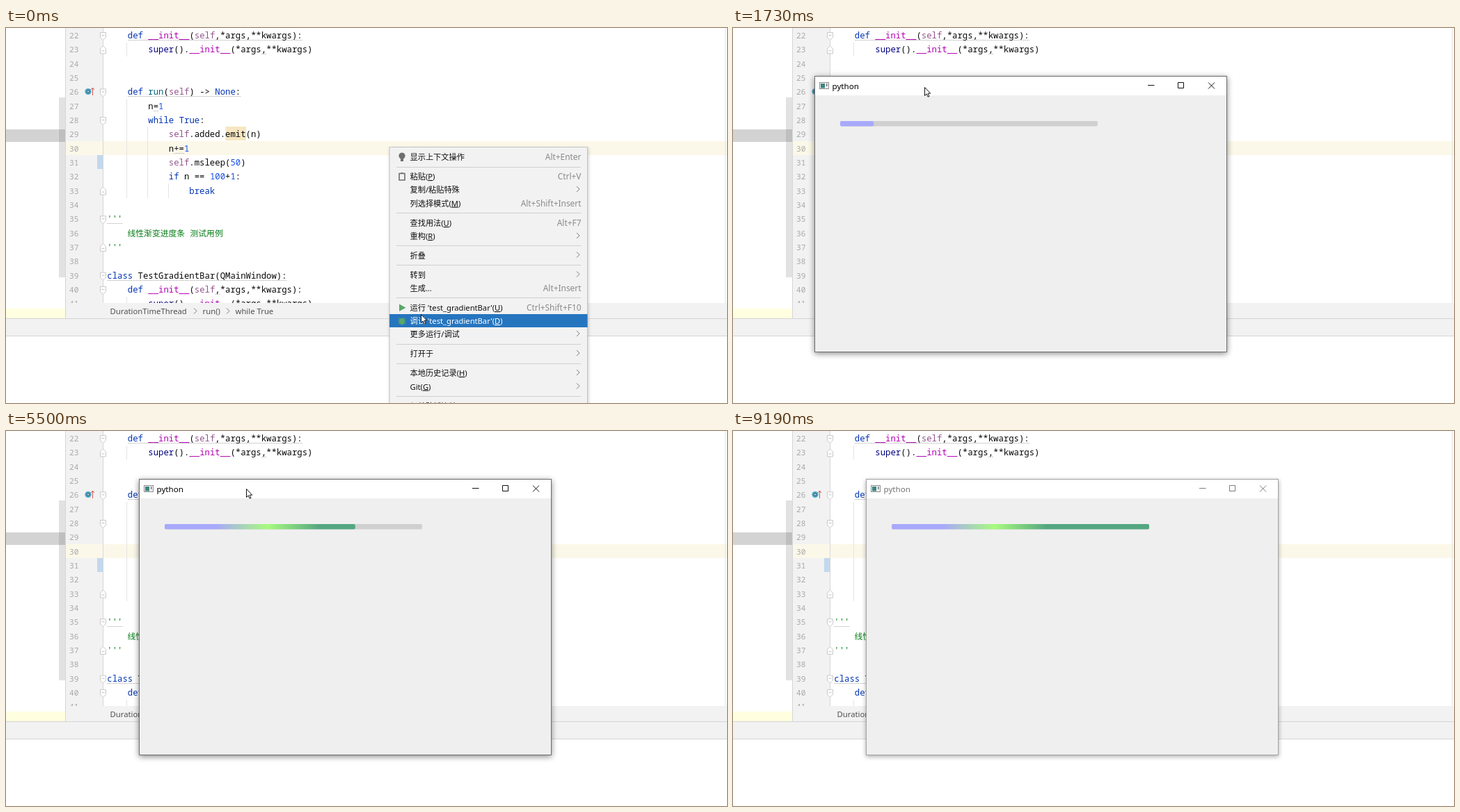
Animation, 1036 px wide and 540 px high, one loop 9230 ms. Source, as an HTML page:

```html
<!DOCTYPE html>
<html lang="zh">
<head>
<meta charset="utf-8">
<style>
  html, body { margin: 0; width: 100%; height: 100%; overflow: hidden; background: #fff; }
  svg { display: block; width: 1036px; height: 540px; }
  text { white-space: pre; font: 11.3px "Noto Sans", "Noto Sans CJK SC", sans-serif; }
  .code { font: 12.31px "Noto Sans Mono", "DejaVu Sans Mono", monospace; fill: #080808; }
  .num { font-size: 11.2px; fill: #a9a9a9; }
  .kw { fill: #0033b3; }
  .magic { fill: #b200b2; }
  .self { fill: #94558d; }
  .lit { fill: #1750eb; }
  .fn { fill: #00627a; }
  .builtin { fill: #000080; }
  .doc { fill: #067d17; }
  .note { font-size: 11.8px; }
  .crumb { fill: #505050; }
  .item { font-size: 11.2px; fill: #111; }
  .key { font-size: 11.9px; fill: #8a8a8a; text-anchor: end; }
  .picked text { fill: #fff; }
  .u { text-decoration: underline; }
  .title { font-size: 11.6px; }
</style>
</head>
<body>
<svg id="stage" viewBox="0 0 1036 540"></svg>
<script>
const LOOP = 9230, CHAR = 7.386, LEFT = 145.3;
const rowY = n => 11 + (n - 22) * 20.33;
const colX = c => LEFT + c * CHAR;
const rect = (x, y, w, h, fill, more = '') =>
  `<rect x="${x}" y="${y}" width="${w}" height="${h}" fill="${fill}" ${more}/>`;
const path = (d, stroke, fill = 'none', more = '') =>
  `<path d="${d}" stroke="${stroke}" fill="${fill}" ${more}/>`;
const text = (x, y, cls, s) => `<text x="${x}" y="${y}" class="${cls}">${s}</text>`;
const chevron = (x, y) => path(`M${x - 2} ${y - 4}l4 4l-4 4`, '#7a7a7a');

// ---- editor ----
const code = {
  22: '    def __init__(self,*args,**kwargs):',
  23: '        super().__init__(*args,**kwargs)',
  26: '    def run(self) -> None:',
  27: '        n=1',
  28: '        while True:',
  29: '            self.added.emit(n)',
  30: '            n+=1',
  31: '            self.msleep(50)',
  32: '            if n == 100+1:',
  33: '                break',
  35: "'''",
  37: "'''",
  39: 'class TestGradientBar(QMainWindow):',
  40: '    def __init__(self,*args,**kwargs):',
  41: '        super().__init__(*args,**kwargs)'
};
const kinds = [
  [/^(def|class|while|if|break|True|None)$/, 'kw'], [/^__/, 'magic'], [/^self$/, 'self'],
  [/^\d/, 'lit'], [/^run$/, 'fn'], [/^super$/, 'builtin'], [/^'/, 'doc']
];
const paint = s => s.replace(/\w+|'+/g, word => {
  const kind = kinds.find(([re]) => re.test(word));
  return kind ? `<tspan class="${kind[1]}">${word}</tspan>` : word;
}).replace('-> ', '-&gt; ');

function fold(n, up) {
  const y = rowY(n) + 0.5, s = up ? -1 : 1;
  return path(`M135.5 ${y - 5 * s}h8v${7 * s}l-4 ${4 * s}l-4 ${-4 * s}z`, '#c9c9c9', '#fff')
    + path(`M137.5 ${y - s}h4`, '#c0c0c0');
}

function editor() {
  let s = rect(86, 0, 53, 396, '#f2f2f2') + rect(86, 163, 950, 20, '#fcf8e9')
    + rect(0, 146, 85, 18, '#d3d3d3') + rect(76, 100, 9, 259, '#e2e2e2') + rect(76, 146, 9, 18, '#bfbfbf')
    + rect(0, 404, 85, 14, '#ffffe0') + rect(131, 183, 8, 20, '#c2d8ee') + rect(315.5, 142, 29.5, 20, '#f6e6c2')
    + path('M85.5 0V418M139.5 0V396', '#d6d6d6') + path('M1033.5 0V396', '#e2e2e2')
    + path('M173.5 21V41M173.5 102V245M203.5 142V245M233.5 224V245M173.5 387V396', '#e4e4e4');
  const marks = [[22, 4, 38], [23, 30, 31], [26, 4, 26], [27, 9, 10], [30, 13, 15], [35, 0, 3], [39, 0, 35], [40, 21, 22]];
  for (const [n, a, b] of marks)
    s += path(`M${colX(a)} ${Math.round(rowY(n) + 6) + 0.5}H${colX(b)}`, '#c4c4c4', 'none', 'stroke-dasharray="2 .6"');
  for (let n = 22; n <= 41; n++) {
    s += text(91, rowY(n) + 4, 'code num', n);
    if (code[n]) s += text(LEFT, rowY(n) + 4, 'code', paint(code[n]));
  }
  s += text(174.5, 299.5, 'doc note', '线性渐变进度条') + text(264.5, 299.5, 'doc note', '测试用例');
  for (const n of [22, 26, 28, 35, 39, 40]) s += fold(n, false);
  for (const n of [23, 33, 37]) s += fold(n, true);
  s += '<circle cx="118" cy="91.5" r="4.6" fill="#4ba6c9"/><circle cx="118" cy="91.5" r="1.8" fill="#bfe3f0" stroke="#27495a"/>'
    + path('M124.5 97V86.5M122 89l2.5 -3l2.5 3', '#d0574f');
  s += rect(86, 396, 950, 22, '#f2f2f2') + rect(0, 418, 1036, 26, '#f2f2f2')
    + path('M0 418.5H1036M0 443.5H1036', '#d4d4d4')
    + text(149.5, 411.5, 'crumb', 'DurationTimeThread') + chevron(272, 407.5)
    + text(282.5, 411.5, 'crumb', 'run()') + chevron(319, 407.5) + text(329.5, 411.5, 'crumb', 'while True');
  return s;
}

// ---- context menu: centre y, label, shortcut ('>' opens a submenu) ----
const items = [
  [186, '显示上下文操作', 'Alt+Enter'], [214, '粘贴(_P)', 'Ctrl+V'], [233, '复制/粘贴特殊', '>'],
  [252.5, '列选择模式(_M)', 'Alt+Shift+Insert'], [281, '查找用法(_U)', 'Alt+F7'], [300, '重构(_R)', '>'],
  [327.5, '折叠', '>'], [355.5, '转到', '>'], [375, '生成...', 'Alt+Insert'],
  [403, "运行 'test_gradientBar'(_U)", 'Ctrl+Shift+F10'], [422, "调试 'test_gradientBar'(_D)", ''],
  [441, '更多运行/调试', '>'], [469, '打开于', '>'], [497, '本地历史记录(_H)', '>'], [516.5, 'Git(_G)', '>'],
  [545, '与剪贴板比较(_B)', '']
];
function menu() {
  let s = rect(551, 171.5, 284.5, 400, '#f2f2f2', 'stroke="#c2c2c2" style="filter:drop-shadow(1px 2px 2px #0003)"');
  for (const y of [200, 266, 313, 341, 388, 455, 483, 530]) s += path(`M561 ${y + 0.5}H826`, '#cfcfcf');
  s += rect(551, 412, 284.5, 19, '#2675bf', 'id="pick"');
  for (const [y, label, key] of items) {
    const name = label.replace(/\(_(\w)/, '(<tspan class="u">$1</tspan>');
    const end = key === '>' ? chevron(822, y - 1) : text(826.5, y + 4, 'key', key);
    s += `<g id="m${Math.floor(y)}">${text(580.5, y + 4, 'item', name)}${end}</g>`;
  }
  return s + '<circle cx="569" cy="184" r="4.6" fill="#6e6e6e"/>' + rect(567, 188, 4, 4, '#6e6e6e')
    + path('M565 209.5h8v9.5h-8zM567 209h4', '#6e6e6e', 'none', 'stroke-width="1.6"')
    + path('M565 397.5l9.5 5.3l-9.5 5.3z', 'none', '#59a869')
    + path('M564 418l10 8M574 418l-10 8M563.5 422h11', '#59a869', 'none', 'stroke-width="1.3"')
    + '<ellipse cx="569" cy="422.5" rx="3.6" ry="5" fill="#59a869"/>';
}

// ---- application window, drawn with its left edge at x = 0 ----
const appWindow = () =>
  rect(0.5, 69.5, 592, 397, '#efefef', 'id="frame"') + rect(1, 70, 591, 27, '#fff')
  + rect(7.5, 78.5, 13, 9, '#f4f4f4', 'stroke="#8b8b8b"') + rect(9, 80, 6, 6.5, '#3d8583') + rect(17, 80, 1.5, 4, '#777')
  + `<g id="caption">${text(25.5, 87.5, 'title', 'python')}`
  + path('M479 82.5h9.5M522.5 78.5h8v8h-8zM566 78.5l9 9M575 78.5l-9 9', '#111') + '</g>'
  + rect(37, 134, 370, 7.5, '#d0d0d0', 'rx="2"') + rect(37, 134, 0, 7.5, 'url(#ramp)', 'rx="2" id="fill"');

const $ = id => document.getElementById(id);
$('stage').innerHTML = `
  <defs><linearGradient id="ramp" gradientUnits="userSpaceOnUse" x1="37" x2="407">
    <stop offset=".2" stop-color="#a9a9fb"/><stop offset=".4" stop-color="#a7fb7d"/><stop offset=".6" stop-color="#55a781"/>
  </linearGradient></defs>
  ${editor()}
  ${rect(263, 165, 1.5, 17, '#000', 'id="caret"')}
  <g id="console">${text(-5.4, 458.5, 'code builtin', 'env\\Scripts\\python.exe D:/myGitProject/PyQtGuiLib/PyQtGuiLib/tests/test_gradientBar.py')}</g>
  <g id="menu">${menu()}</g>
  <g id="win">${appWindow()}</g>
  <g id="arrow">${path('M.5 .5v12l2.7 -2.6l1.9 4.3l1.9 -.8l-1.9 -4.2h3.6z', '#111', '#fff')}</g>
  <g id="resize">${path('M.5 -8l3.5 4h-2.5v8h2.5l-3.5 4l-3.5 -4h2.5v-8h-2.5z', '#111', '#fff')}</g>`;

// ---- motion: rows of time, then values ----
const pointer = [
  [0, 596, 412], [160, 599, 404], [280, 601, 401], [720, 601, 401], [1080, 473, 357], [1600, 276, 87],
  [1730, 275, 85], [1800, 275, 85], [2410, 328, 83], [2560, 349, 83], [2610, 345, 83], [5600, 345, 83],
  [6420, 379, 83], [7140, 438, 82], [7420, 792, 160], [7700, 961, 420], [7990, 955, 545]
];
const drag = [[1800, 117], [2410, 168], [2560, 191]];

function at(track, t, k) {
  const i = track.findIndex(p => p[0] > t);
  if (i === 0) return track[0][k];
  if (i < 0) return track[track.length - 1][k];
  const a = track[i - 1], b = track[i];
  return a[k] + (b[k] - a[k]) * (t - a[0]) / (b[0] - a[0]);
}
const clamp = v => Math.max(0, Math.min(1, v));
const show = (id, on) => $(id).style.display = on ? '' : 'none';
const set = (id, name, value) => $(id).setAttribute(name, value);

function draw(t) {
  const x = Math.round(at(pointer, t, 1)), y = Math.round(at(pointer, t, 2));
  const sizing = t >= 7080 && t < 7200;
  show('arrow', !sizing);
  show('resize', sizing);
  set(sizing ? 'resize' : 'arrow', 'transform', `translate(${x} ${y})`);

  const run = y < 412;
  show('menu', t < 440);
  set('pick', 'y', run ? 393 : 412);
  set('m403', 'class', run ? 'picked' : '');
  set('m422', 'class', run ? '' : 'picked');
  show('caret', t >= 440 && t < 720);
  show('console', t >= 720 && t < 1300);

  const age = t - 1000, active = t < 9150;
  const scale = 1 - 0.1 * (1 - clamp(age / 220)) ** 3;
  const left = Math.round(at(drag, t, 1));
  show('win', age >= 0);
  set('win', 'transform', `translate(${left + 296.5} 268) scale(${scale}) translate(-296.5 -268)`);
  $('win').style.opacity = clamp(age / 165);
  $('win').style.filter = active ? 'drop-shadow(0 2px 4px #0007)' : 'drop-shadow(0 2px 3px #0005)';
  set('frame', 'stroke', active ? '#6c6c6c' : '#a2a2a2');
  $('caption').style.opacity = active ? 1 : 0.55;
  const percent = Math.round(100 * clamp((t - 927) / 6180));
  set('fill', 'width', percent * 3.7);
}

const start = performance.now();
function tick() {
  draw((performance.now() - start) % LOOP);
  requestAnimationFrame(tick);
}
tick();
</script>
</body>
</html>
```
